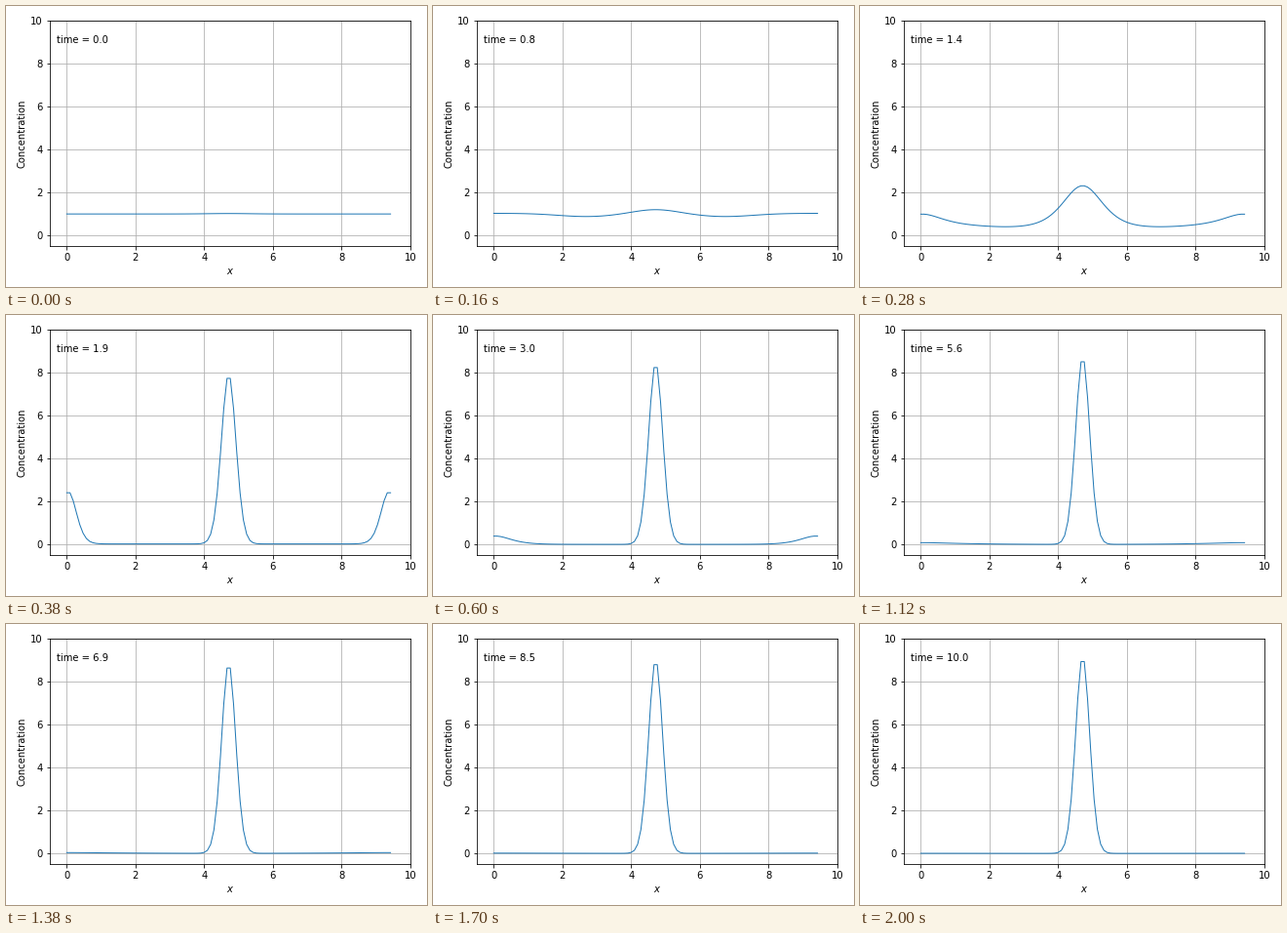
A matplotlib script that plays this animation: 432 px wide and 288 px high, repeating every 2020 ms.

```python
import numpy as np
import matplotlib.pyplot as plt
from matplotlib.animation import FuncAnimation

FRAMES, STEP = 101, 0.1
L = 3 * np.pi
x = np.linspace(0, L, 100)
h = x[1]
mid = np.abs(x - L / 2)
edge = np.maximum(np.minimum(x, L - x) - h / 2, h / 2)

T_LIN, T_AGG = 0.8, 1.9  # end of linear growth, end of aggregation
FLOOR = 0.025


def spike(d, height, var, b):
    """Gaussian core with exponential tails, equal to height at d = h/2."""
    f = lambda r: b**2 / var * (np.sqrt(1 + (r / b) ** 2) - 1)
    return height * np.exp(f(h / 2) - f(d))


def spikes(top, top_var, rim, rim_var):
    return spike(mid, top, top_var, 0.88) + spike(edge, rim, rim_var, 0.55)


def ramp(t, end, rate):
    """Exponential growth from 0 at t = 0 to 1 at t = end."""
    return np.expm1(rate * t) / np.expm1(rate * end)


def ripple(t):
    """Small perturbation growing on the uniform state."""
    g = ramp(t, T_LIN, 3.1)
    dip = np.exp(-((mid - 2) ** 2) / 1.445) + np.exp(-((mid + 2) ** 2) / 1.445)
    bump = 0.02 * np.exp(2.8 * t - mid**2 / 0.8)
    return 1 + bump + g * (0.03 - 0.15 * dip)


def collapse(t):
    """The background drains while the spikes grow and narrow."""
    s = ramp(t - T_LIN, T_AGG - T_LIN, 2.5)
    wide = 0.4 * (1 - s) ** 2
    base = ripple(T_LIN) ** (1 - s) * FLOOR**s
    return base + spikes(7.7 * s, 0.0445 + wide, 2.38 * s, 0.051 + wide)


def settle(t):
    """The edge spikes decay and the central one slowly gains height."""
    a = t - T_AGG
    top = 8.13 + 0.098 * a - 0.43 * np.exp(-3 * a)
    top_var = 0.0415 + 0.003 * np.exp(-3 * a)
    rim = 0.68 * np.exp(-0.57 * a) + 1.7 * np.exp(-4 * a)
    rim_var = 0.051 + 0.09 * a + 0.02 * a**2
    return FLOOR * np.exp(-1.5 * a) + spikes(top, top_var, rim, rim_var)


def profile(t):
    if t <= T_LIN:
        return ripple(t)
    return collapse(t) if t < T_AGG else settle(t)


fig, ax = plt.subplots(figsize=(6, 4), dpi=72)
line, = ax.plot(x, profile(0), lw=1, color="#1f77b4")
label = ax.text(0.02, 0.9, "time = 0.0", transform=ax.transAxes)
ax.set(xlim=(-0.5, 10), ylim=(-0.5, 10), xlabel="$x$", ylabel="Concentration")
ax.grid(True)
fig.tight_layout()
fig.subplots_adjust(left=44.7 / 432)


def update(i):
    t = i * STEP
    line.set_ydata(profile(t))
    label.set_text(f"time = {t:.1f}")
    return line, label


anim = FuncAnimation(fig, update, frames=FRAMES, interval=20, repeat=True, repeat_delay=0)
plt.show()
```
